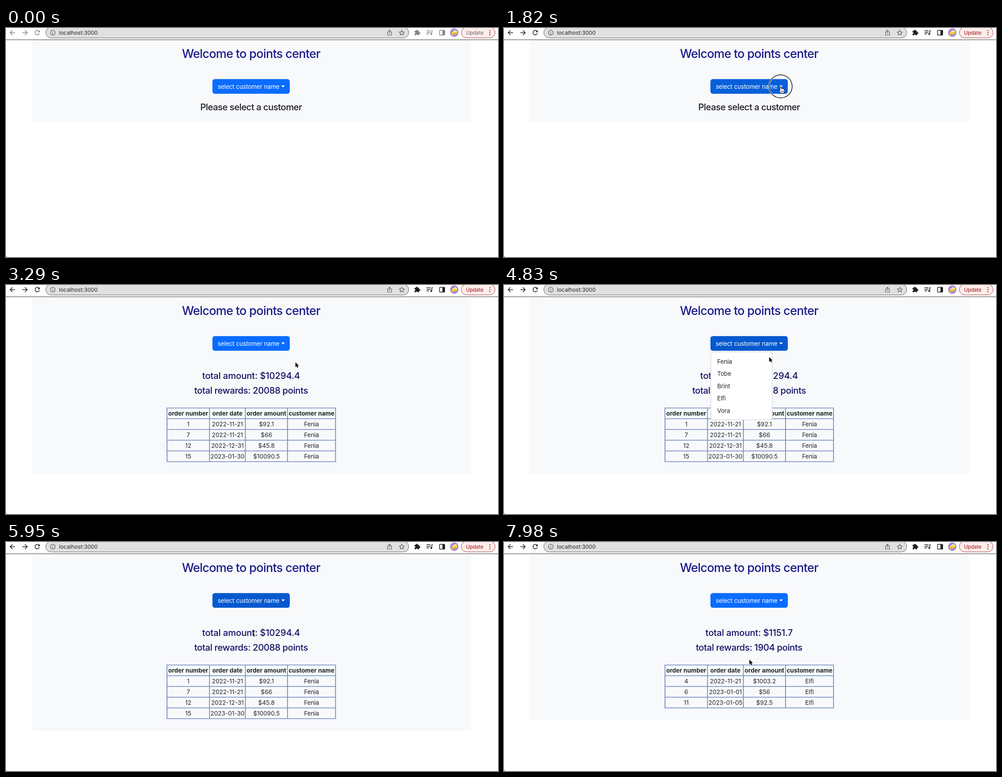
Recreate the animation shown at these times as an HTML page. Size 1094 by 512 pixels, loop 8000 ms.

```html
<!DOCTYPE html>
<html lang="en">
<head>
<meta charset="utf-8">
<title>Points center</title>
<style>
html, body { margin: 0; width: 100%; height: 100%; overflow: hidden; background: #fff; }
svg { display: block; width: 100vw; height: 100vh; }
text { font-family: Inter, "Open Sans", sans-serif; font-size: 13.4px; font-optical-sizing: none; fill: #212529; }
.mid { text-anchor: middle; }
.title { font-size: 26.7px; font-weight: 500; letter-spacing: -.028em; fill: #1a1a89; }
.prompt { font-size: 20px; font-weight: 500; letter-spacing: -.027em; fill: #1a1d21; }
.amount, .rewards { font-size: 20px; font-weight: 500; fill: #111163; }
.amount { letter-spacing: -.009em; }
.rewards { letter-spacing: -.02em; }
.head { font-weight: 700; }
.word { letter-spacing: -.01em; }
.line { fill: none; stroke: currentColor; stroke-width: 1.5; }
.thin { fill: none; stroke: #5c5e61; stroke-width: 1.2; }
</style>
</head>
<body>
<svg id="stage" viewBox="0 0 1094 512" xmlns="http://www.w3.org/2000/svg"></svg>
<script>
const LOOP = 8000, STEP = 70;
const NAMES = ["Fenia", "Tobe", "Brint", "Elfi", "Vora"];
const HEADS = ["order number", "order date", "order amount", "customer name"];
const EDGES = [358, 452.5, 532.3, 626, 732.7];
const TOP = 275, ROW = 24, ITEM = 27.5, MENU_TOP = 157.2;

const ORDERS = [
  { from: 2940, name: NAMES[0], amount: "10294.4", points: 20088, half: 108,
    rows: ["1 2022-11-21 $92.1", "7 2022-11-21 $66", "12 2022-12-31 $45.8", "15 2023-01-30 $10090.5"] },
  { from: 6090, name: NAMES[1], amount: "172.1", points: 13, half: 92,
    rows: ["2 2023-01-04 $32.5", "8 2023-01-21 $63", "14 2023-01-21 $33", "16 2023-01-25 $43.6"] },
  { from: 7910, name: NAMES[3], amount: "1151.7", points: 1904, half: 97,
    rows: ["4 2022-11-21 $1003.2", "6 2023-01-01 $56", "11 2023-01-05 $92.5"] }
];

// Pointer path: time, x, y
const PATH = [
  [70, 1003, 482], [210, 740, 360], [350, 505, 285], [490, 584, 240],
  [560, 584, 240], [630, 590, 215], [840, 620, 117], [910, 614, 125],
  [1610, 614, 125], [1680, 615, 130.5], [2310, 615, 130.5], [2590, 562, 174],
  [3220, 562, 174], [3290, 643, 172], [3430, 714, 200], [3500, 715, 208],
  [3710, 715, 208], [3920, 648, 172], [4130, 600, 131], [4760, 600, 131],
  [4830, 589, 160], [5250, 552, 211], [5810, 552, 211], [5950, 551, 204],
  [6160, 551, 204], [6510, 595, 132], [6860, 595, 132], [7070, 578, 189],
  [7350, 545, 261], [7490, 545, 261], [7560, 545, 262]
];
const PRESSES = [[1050, 1330], [1680, 1960], [2660, 2800], [4410, 4550], [5460, 5810], [6650, 6790], [7700, 7770]];
const MENUS = [[1960, 2800], [4550, 5810], [6790, 7770]];
const WAKE = 1120, HOVER = 1190, FOCUS_FADE = 210;

const text = (x, y, cls, s, more = "") => `<text x="${x}" y="${y}" class="${cls}" ${more}>${s}</text>`;
const mid = i => (EDGES[i] + EDGES[i + 1]) / 2;

function table(o) {
  const bottom = TOP + ROW * (o.rows.length + 1);
  let grid = "", cells = "";
  for (const x of EDGES) grid += `M${x} ${TOP - .8}V${bottom + .8}`;
  for (let y = TOP; y <= bottom; y += ROW) grid += `M${EDGES[0]} ${y}H${EDGES[4]}`;
  HEADS.forEach((h, i) => cells += text(mid(i), TOP + 17, "mid head", h));
  o.rows.forEach((r, j) => [...r.split(" "), o.name].forEach((c, i) =>
    cells += text(mid(i), TOP + 17 + ROW * (j + 1), i == 3 ? "mid word" : "mid", c)));
  return `<rect x="358" y="${TOP}" width="375" height="${ROW}" fill="#f6fdfb"/>
    <path d="${grid}" fill="none" stroke="#6c86bf" stroke-width="1.7"/>${cells}`;
}

const orderView = o => `<g class="order">
  ${text(545, 210, "mid amount", `total amount: $${o.amount}`)}
  ${text(545, 243, "mid rewards", `total rewards: ${o.points} points`)}
  ${table(o)}</g>`;

const toolbar = `
  <path d="M0 26.4H1094" stroke="#5e5e5e" stroke-width="1.3"/>
  <rect x="88.5" y="-2" width="807" height="24.3" rx="12.1" fill="#e0e0e0" stroke="#606060"/>
  <g id="nav">
    <path class="line" d="M20 10.5H9.5M14.5 5.3L9.3 10.5L14.5 15.7M36.5 10.5H47M42 5.3L47.2 10.5L42 15.7"/>
    <path class="line" d="M73.4 7.1A5 5 0 1 0 74.4 11.6"/>
    <path d="M75 4.8V9.6H70.2Z" fill="currentColor"/>
    <g fill="currentColor">
      <rect x="908.5" y="6.3" width="10" height="10" rx="1.2"/>
      <circle cx="913.5" cy="6" r="2.1"/><circle cx="919.2" cy="11.3" r="2.1"/>
      <circle cx="945.5" cy="13.6" r="2"/>
      <path d="M970.5 5h5.5v11h-5.5z"/>
    </g>
    <circle cx="908.6" cy="11.3" r="1.8" fill="#fff"/><circle cx="913.5" cy="16.4" r="1.8" fill="#fff"/>
    <path class="line" d="M935 6.2H944M935 9.7H944M935 13.2H940.5M946.7 13.6V6.2H949"/>
    <rect class="line" x="964" y="5.2" width="11.4" height="10.6" rx=".8"/>
  </g>
  <circle class="thin" cx="104" cy="10.5" r="5.3"/>
  <path class="thin" d="M104 9.8V13.4M104 7.4V8.6"/>
  <path class="thin" d="M850.5 8.8H848.4V16H857.2V8.8H855.1M852.8 13V5M850 7.6L852.8 4.8L855.6 7.6"/>
  <path class="thin" stroke-linejoin="round" d="M880 4.8L881.7 8.6L885.8 9L882.7 11.7L883.6 15.8L880 13.6L876.4 15.8L877.3 11.7L874.2 9L878.3 8.6Z"/>
  ${text(117.8, 14.8, "", "localhost:3000", 'style="font-size:12.2px"')}
  <circle cx="996.8" cy="10.4" r="9.4" fill="#a284dd"/>
  <path d="M990.5 10.5L998 4.8Q1003 5.2 1003.6 9V13L992 16.2Z" fill="#f3c63f"/>
  <path d="M990.5 10.5L998 4.8Q1003 5.2 1003.6 9Z" fill="#ffe58a"/>
  <circle cx="995" cy="12.9" r="1.2" fill="#c98f25"/><circle cx="1000" cy="11.7" r="1.1" fill="#c98f25"/>
  <rect x="1012.5" y="-1.5" width="75" height="23.5" rx="11.7" fill="#fceeed" stroke="#a6403c"/>
  ${text(1023, 14.6, "", "Update", 'id="update" style="font-size:11.2px;font-weight:500"')}
  <g fill="#b3261e"><circle cx="1076" cy="6" r="1.3"/><circle cx="1076" cy="10.5" r="1.3"/><circle cx="1076" cy="15" r="1.3"/></g>`;

const menu = `<g id="menu">
  <rect x="459.9" y="149.6" width="136.5" height="151.8" rx="5" fill="#fff" stroke="#cbcdd1"/>
  <rect id="mark" x="460.4" width="135.5" height="${ITEM}"/>
  ${NAMES.map((n, i) => text(474, 175.6 + ITEM * i, "word item", n)).join("")}</g>`;

const pointer = `<g id="pointer">
  <g id="ring" fill="none"><circle r="25.8" stroke="#fff" stroke-width="3.2"/><circle r="25.8" stroke="#111" stroke-width="1.5"/></g>
  <path id="arrow" transform="translate(.6 1) scale(.88)" d="M0 0V12.2L2.8 9.6L4.7 14L6.9 13L5 8.8H8.8Z" fill="#000" stroke="#fff" stroke-width="1" stroke-linejoin="round" paint-order="stroke"/>
  <path id="hand" d="M-1.2 9.2V1.2Q-1.2 0 0 0T1.3 1.2V5Q2.6 4.3 3.8 5.4Q5.2 4.8 6.2 6Q8.6 5.6 8.6 8V10.5Q8.6 12.5 7.2 15H.6L-3.6 9.6Q-4 7.6 -1.2 9.2ZM2.2 9.5V12.4M4.2 9.5V12.4M6.1 9.5V12.4" fill="#fff" stroke="#1a1a1a" stroke-width="1" stroke-linejoin="round"/>
  <path id="beam" d="M-2.5 -6.5Q0 -6.5 0 -5V5Q0 6.5 -2.5 6.5M2.5 -6.5Q0 -6.5 0 -5M0 5Q0 6.5 2.5 6.5M-1.5 2.5H1.5" fill="none" stroke="#222" stroke-width="1.1"/></g>`;

const stage = document.getElementById("stage");
stage.innerHTML = `
  <rect width="1094" height="512" fill="#fff"/>
  <rect id="panel" x="56.8" y="27" width="977.4" rx="7" fill="#f8f9fb"/>
  ${toolbar}
  ${text(545, 66.8, "mid title", "Welcome to points center")}
  <rect id="button" x="459" y="114.2" width="172" height="32.8" rx="5.2"/>
  ${text(470.7, 136, "word", "select customer name", 'style="fill:#fff"')}
  <path d="M612 128.6H620.2L616.1 132.7Z" fill="#fff"/>
  ${text(545, 184, "mid prompt", "Please select a customer", 'id="prompt"')}
  ${ORDERS.map(orderView).join("")}
  ${menu}${pointer}
  <path d="M0 509.5V512H2.5Q.5 511.5 0 509.5Z" fill="#333"/>`;

const el = {};
stage.querySelectorAll("[id]").forEach(e => el[e.id] = e);
const orderEls = stage.querySelectorAll(".order"), items = stage.querySelectorAll(".item");
const show = (e, on) => e.style.display = on ? "" : "none";
const within = (spans, t, extra = 0) => spans.some(([a, b]) => t >= a && t < b + extra);

function position(t) {
  const i = PATH.findIndex(k => k[0] > t);
  if (i < 0) return PATH[PATH.length - 1].slice(1);
  if (i == 0) return PATH[0].slice(1);
  const [t0, x0, y0] = PATH[i - 1], [t1, x1, y1] = PATH[i], u = (t - t0) / (t1 - t0);
  return [x0 + (x1 - x0) * u, y0 + (y1 - y0) * u];
}

function render(t) {
  const [x, y] = position(t);
  const open = within(MENUS, t), pressed = within(PRESSES, t);
  const current = ORDERS.filter(o => t >= o.from).length - 1, order = ORDERS[current];

  el.nav.style.color = t < WAKE ? "#858585" : "#1f1f1f";
  el.update.style.fill = t < WAKE ? "#857172" : "#ad2b26";
  el.panel.setAttribute("height", order ? 300 + ROW * order.rows.length : 182.5);
  show(el.prompt, !order);
  orderEls.forEach((e, i) => show(e, i == current));

  const onButton = t >= HOVER && x > 459 && x < 631 && y > 115 && y < 147;
  const onMenu = open && x > 460 && x < 596 && y > 162;
  const onText = !open && order && Math.abs(x - 545) < order.half && y > 192 && y < 214;
  el.button.setAttribute("fill", within(MENUS, t, FOCUS_FADE) ? "#0558ce" : onButton ? "#0660da" : "#0a6cff");

  show(el.menu, open);
  const row = onMenu ? Math.floor((y - MENU_TOP) / ITEM) : -1;
  show(el.mark, onMenu);
  el.mark.setAttribute("y", MENU_TOP + ITEM * Math.max(row, 0));
  el.mark.setAttribute("fill", pressed ? "#0a6cff" : "#f8f9fa");
  items.forEach((e, i) => e.style.fill = pressed && i == row ? "#fff" : "");

  const hand = onButton || onMenu;
  show(el.pointer, t >= PATH[0][0]);
  el.pointer.setAttribute("transform", `translate(${x} ${y})`);
  show(el.ring, pressed);
  show(el.hand, hand);
  show(el.beam, onText);
  show(el.arrow, !hand && !onText);
}

const start = performance.now();
function tick() {
  const t = (performance.now() - start) % LOOP;
  render(Math.floor(t / STEP) * STEP);
  requestAnimationFrame(tick);
}
tick();
</script>
</body>
</html>
```
